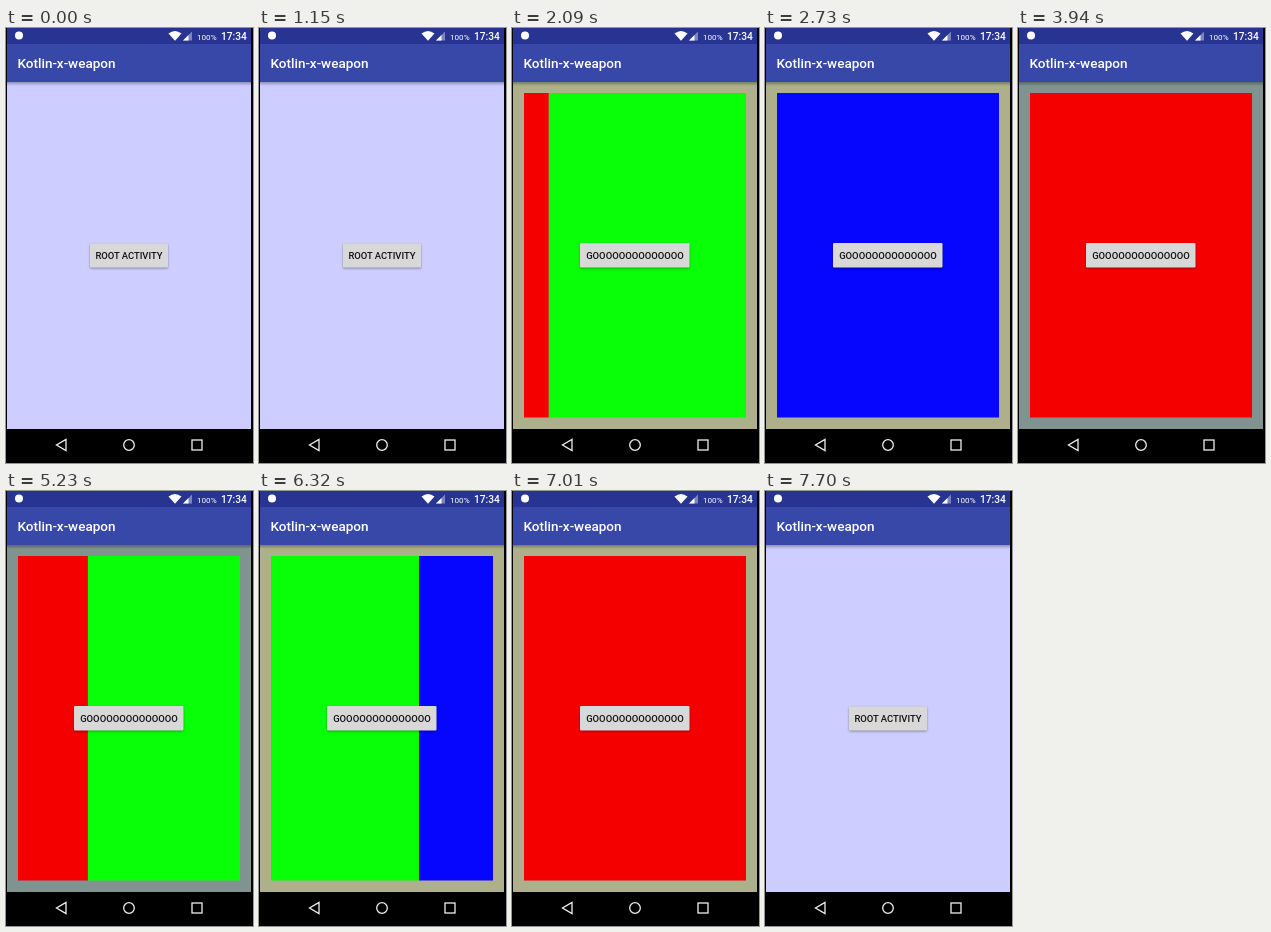
These frames come from a looping animation (247x435 px, 8.22 s). An HTML page:

```html
<!DOCTYPE html>
<html lang="en">
<head>
<meta charset="utf-8">
<title>Pager demo</title>
<style>
  html, body { margin: 0; width: 100%; height: 100%; overflow: hidden; background: #000; }
  svg { display: block; width: 247px; height: 435px; }
  text { font-family: Roboto, "Liberation Sans", sans-serif; font-weight: 500; fill: #fff; }
  .label { font-size: 9.45px; fill: #111; text-anchor: middle; }
  .btn { fill: #d8d8d8; filter: drop-shadow(0 1px 1px rgba(0, 0, 0, .35)); }
  .nav { fill: none; stroke: #eee; stroke-width: 1.3; }
</style>
</head>
<body>
<svg viewBox="0 0 247 435">
  <defs>
    <clipPath id="screen"><rect x="1" y="54" width="244" height="347"/></clipPath>
    <clipPath id="frame"><rect x="12" y="65" width="222" height="324.500"/></clipPath>
    <linearGradient id="shade" x2="0" y2="1">
      <stop stop-opacity=".3"/><stop offset="1" stop-opacity="0"/>
    </linearGradient>
  </defs>
  <rect width="247" height="435"/>

  <g clip-path="url(#screen)">
    <rect x="1" y="54" width="244" height="347" fill="#cdcdff"/>
    <rect class="btn" x="84" y="215.500" width="78" height="24" rx="1"/>
    <text class="label" x="123" y="230.6">ROOT ACTIVITY</text>

    <g id="activity">
      <rect id="back" x="1" y="54" width="244" height="347"/>
      <g clip-path="url(#frame)">
        <g id="pages">
          <rect x="12" y="65" width="222" height="325" fill="#f40000"/>
          <rect x="234" y="65" width="222" height="325" fill="#08ff08"/>
          <rect x="456" y="65" width="222" height="325" fill="#0606ff"/>
        </g>
      </g>
      <rect class="btn" x="68" y="215" width="109.500" height="24.500" rx="1"/>
      <text class="label" x="123" y="230.6">GOOOOOOOOOOOOOO</text>
    </g>
    <rect x="1" y="54" width="244" height="4" fill="url(#shade)"/>
  </g>

  <rect x="1" width="244" height="16" fill="#283492"/>
  <rect x="1" y="16" width="244" height="38" fill="#3848a9"/>
  <text x="11.500" y="40" font-size="13.5">Kotlin-x-weapon</text>
  <circle cx="13" cy="7.500" r="4" fill="#fff"/>
  <path d="M162.500 5.500Q169 .5 175.500 5.500L169 12.700Z" fill="#fff"/>
  <path d="M186 3.500V12.500H177Z" fill="#7c84bd"/>
  <path d="M182.500 7V12.500H177Z" fill="#fff"/>
  <text x="191" y="11.500" font-size="8.1" style="font-weight: 400">100%</text>
  <text x="215" y="12" font-size="10.2">17:34</text>

  <path class="nav" d="M60 411.500V422.500L50.500 417Z"/>
  <circle class="nav" cx="123" cy="417" r="5.300"/>
  <rect class="nav" x="186" y="412" width="10" height="10"/>
</svg>
<script>
const LOOP = 8220, PAGE = 222;
const STEP = 130;    // the screen refreshes a swipe this often, in ms
const STRIDE = .357; // share of a swipe covered per refresh
const REST = 425;    // the background follows a page left alone this long
const BACKS = ['#adb08b', '#809390', '#809390'];

// Each swipe: first visible move, page it leads to, share already travelled.
const swipes = [
  [1940, 1, .435], [2330, 2, .38], [3430, 1, .38], [3670, 0, .38], [4090, 1, .38],
  [4360, 2, .38], [4790, 1, .28], [5230, 0, .374], [5930, 1, .38], [6320, 2, .387], [6620, 0, .18]
];

const $ = id => document.getElementById(id);
const smooth = x => {
  const c = Math.min(1, Math.max(0, x));
  return c * c * (3 - 2 * c);
};

function pagerAt(t) {
  let pos = 0, page = 0, rested = 0;
  swipes.forEach(([start, to, lead], i) => {
    if (t < start) return;
    const steps = Math.floor((t - start) / STEP);
    pos = page + (to - page) * smooth(lead + steps * STRIDE);
    page = to;
    const end = Math.min(t, swipes[i + 1]?.[0] ?? LOOP);
    if (end - start >= REST) rested = to;
  });
  return { pos, rested };
}

function draw(now) {
  const t = now % LOOP;
  const { pos, rested } = pagerAt(t);
  const shown = smooth((t - 1150) / 390) * smooth((7550 - t) / 450);
  $('activity').setAttribute('opacity', shown);
  $('activity').setAttribute('transform', `translate(0 ${(1 - shown) * 28})`);
  $('back').setAttribute('fill', BACKS[rested]);
  $('pages').setAttribute('transform', `translate(${-pos * PAGE} 0)`);
  requestAnimationFrame(draw);
}
requestAnimationFrame(draw);
</script>
</body>
</html>
```
